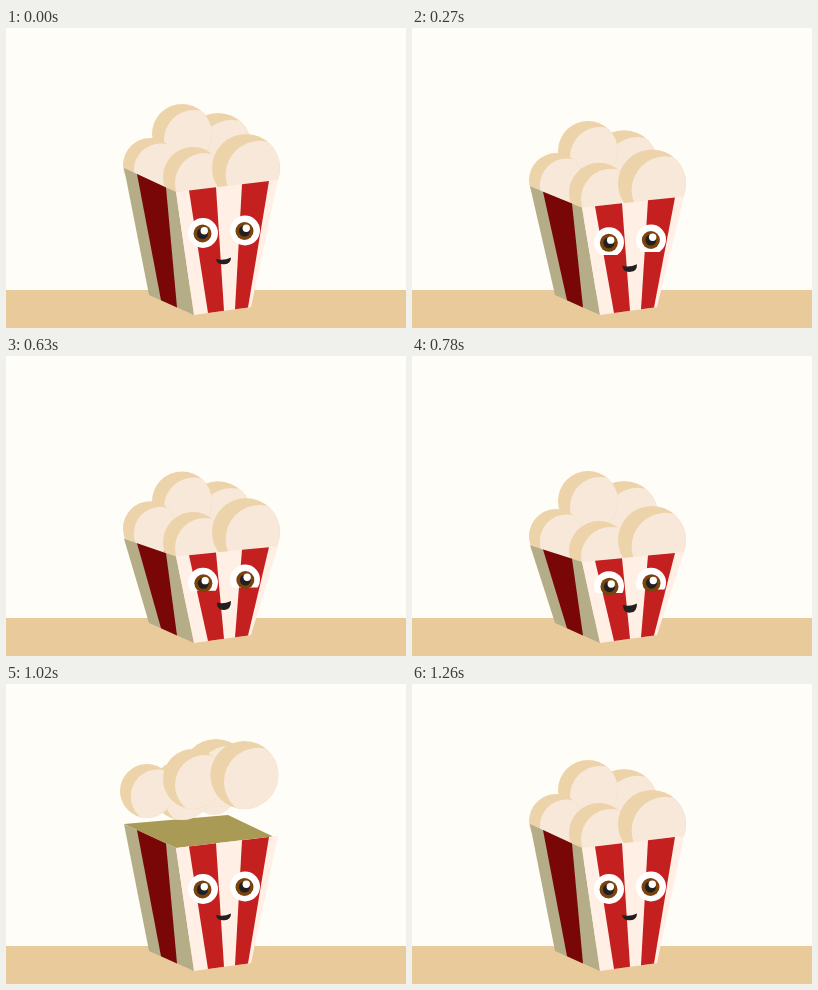
An HTML page with a canvas for the animation above (1680 ms loop, 400x300 px).

```html
<!DOCTYPE html>
<html>
<head>
<meta charset="utf-8">
<style>
  html, body { margin: 0; width: 100%; height: 100%; overflow: hidden; background: #fffdf8; }
  canvas { display: block; }
</style>
</head>
<body>
<canvas id="stage" width="400" height="300"></canvas>
<script>
const ctx = document.getElementById('stage').getContext('2d');
const LOOP = 1680, STEP = 30, END = 1260;
const PRESS = 750, RELEASE = 260;
const KEY_TIMES = [0, 750, 780, 900, 1020, 1065, 1170, 1260];

// Back to front: rest position, radius, sideways drift and vertical offsets at KEY_TIMES
const kernels = [
  { x: 212, y: 119, r: 34, drift: -2, dy: [0, 48, 40, 13, -30, -30, -18, 0] },
  { x: 176, y: 106, r: 30, drift: 0, dy: [0, 47, 39, 13, 0, 0, 0, 0] },
  { x: 144, y: 137, r: 27, drift: -3, dy: [0, 42, 43, 18, -30, -31, -18, 0] },
  { x: 187, y: 149, r: 30, drift: 0, dy: [0, 44, 46, 9, -54, -57, -33, 0] },
  { x: 240, y: 140, r: 34, drift: -1, dy: [0, 43, 44, 18, -49, -52, -30, 0] }
];

const lerp = (a, b, p) => a + (b - a) * p;

function keyed(values, t) {
  let i = 1;
  while (i < KEY_TIMES.length - 1 && t > KEY_TIMES[i]) i++;
  const p = (t - KEY_TIMES[i - 1]) / (KEY_TIMES[i] - KEY_TIMES[i - 1]);
  return lerp(values[i - 1], values[i], p);
}

function squash(t) {
  if (t < PRESS) return t / PRESS;
  const p = Math.min(1, (t - PRESS) / RELEASE);
  return (1 + Math.cos(Math.PI * p)) / 2;
}

function disc(x, y, r, color) {
  ctx.fillStyle = color;
  ctx.beginPath();
  ctx.arc(x, y, r, 0, Math.PI * 2);
  ctx.fill();
}

function poly(color, ...points) {
  ctx.fillStyle = color;
  ctx.beginPath();
  points.forEach(([x, y]) => ctx.lineTo(x, y));
  ctx.fill();
}

function kernel({ x, y, r, drift, dy }, t) {
  const rise = keyed(dy, t);
  const cx = x + drift * Math.max(0, -rise) / 30, cy = y + rise;
  disc(cx, cy, r, '#edd3a9');
  ctx.save();
  ctx.clip();
  disc(cx + r * 0.4, cy + r * 0.2, r, '#f8e8d9');
  ctx.restore();
}

// Band of a wall between two positions along its top and bottom edges
function band(color, top, bottom, [t0, t1, b0, b1]) {
  const at = ([[x0, y0], [x1, y1]], x) => [x, lerp(y0, y1, (x - x0) / (x1 - x0))];
  poly(color, at(top, t0), at(top, t1), at(bottom, b1), at(bottom, b0));
}

function eye(x, y, s) {
  ctx.save();
  ctx.beginPath();
  ctx.rect(x - 20, y - 20, 40, 36 - 9.5 * s);
  ctx.clip();
  disc(x, y, 15, '#fff');
  ctx.restore();
  const px = x - 0.5 + s, py = y + 0.5;
  disc(px, py, 9, '#7b430c');
  disc(px, py, 5.5, '#231f20');
  disc(px + 1.8, py - 2.7, 3.7, '#fff');
}

function mouth(s) {
  const y = 231 + 18.5 * s, x = 210 + s, open = 2.5 * s;
  ctx.fillStyle = '#231f20';
  ctx.beginPath();
  ctx.moveTo(x, y);
  ctx.quadraticCurveTo(217.5, y + 2, 225, y - 1.5);
  ctx.quadraticCurveTo(225, y + 5 + open, 218.5, y + 5.3 + open);
  ctx.quadraticCurveTo(211, y + 6 + open, x, y);
  ctx.fill();
}

function draw(t) {
  const s = squash(t);
  const left = [118, 140 + 51 * s], front = [170, 164 + 43.5 * s];
  const right = [272, 152 + 45.5 * s], back = [222, 131 + 47 * s];
  const sideTop = [left, front], sideBottom = [[143, 267], [188, 287]];
  const faceTop = [front, right], faceBottom = [[188, 287], [245, 279]];

  ctx.fillStyle = '#fffdf8';
  ctx.fillRect(0, 0, 400, 300);
  ctx.fillStyle = '#e9ca9a';
  ctx.fillRect(0, 262, 400, 38);

  poly('#a99a55', left, back, [267, right[1] + 0.6], front);
  disc(208, 110 + 47 * s, 21, '#f8e8d9');
  kernels.forEach(k => kernel(k, t));

  band('#b5ad88', sideTop, sideBottom, [118, 170, 143, 188]);
  band('#790708', sideTop, sideBottom, [131, 160, 155, 171]);
  band('#ffefe5', faceTop, faceBottom, [170, 272, 188, 245]);
  band('#c42020', faceTop, faceBottom, [183, 210, 202, 218]);
  band('#c42020', faceTop, faceBottom, [236, 263, 229, 242]);

  eye(197, 205 + 26 * s, s);
  eye(239, 202.5 + 25 * s, s);
  mouth(s);
}

function tick(now) {
  const t = Math.floor((now % LOOP) / STEP) * STEP;
  draw(Math.min(t, END));
  requestAnimationFrame(tick);
}
tick(performance.now());
</script>
</body>
</html>
```
